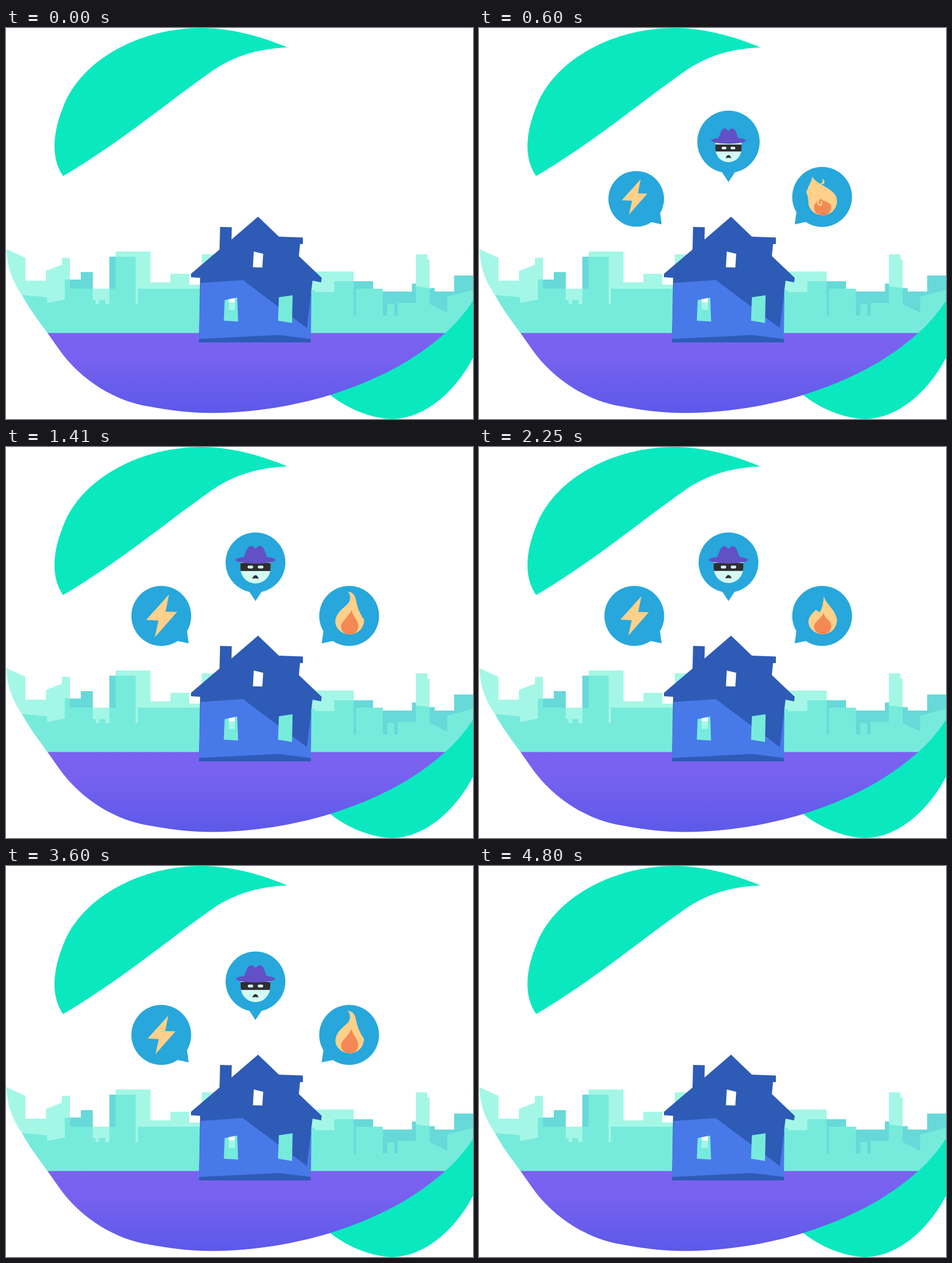
An HTML page with a canvas for the animation above (5.43 s loop, 818 by 684 pixels).

```html
<!DOCTYPE html>
<html lang="en">
<head>
<meta charset="utf-8">
<title>Home risks</title>
<style>
html, body { margin: 0; width: 100%; height: 100%; overflow: hidden; background: #fff; }
canvas { display: block; width: 818px; height: 684px; }
</style>
</head>
<body>
<canvas id="stage" width="818" height="684"></canvas>
<script>
const ctx = document.getElementById('stage').getContext('2d');
const LOOP = 5430, STEP = 30, END = 4.8, EXIT = 0.28;
const C = {
  teal: '#0ae8c0', skyLight: '#a4f7e6', skyMid: '#77ebdb', skyDark: '#67d9d9',
  wallDark: '#2d5bb6', wall: '#4879e9', bubble: '#27a7dc', gold: '#ffd08a',
  ember: '#f58956', hat: '#6250c6', face: '#d3fbf3', mask: '#302e31'
};

function fill(d, color) {
  ctx.fillStyle = color;
  ctx.fill(typeof d === 'string' ? new Path2D(d) : d);
}
function rect(x, y, w, h, color) {
  ctx.fillStyle = color;
  ctx.fillRect(x, y, w, h);
}
function scaled(k, x, y, draw) {
  if (k <= 0) return;
  ctx.save();
  ctx.translate(x, y);
  ctx.scale(k, k);
  ctx.translate(-x, -y);
  draw();
  ctx.restore();
}

// ---- Static scenery ----
const blob = new Path2D('M1 0V387C1 412 9 440 28 467C45 498 60 515 73 534L92 561' +
  'C133 620 197 654 250 662C287 669 325 673.5 362 673.5C435 673 505 661 568 642' +
  'C650 616 715 582 769 534Q797 509 818 477V0Z');

function drawSkyline() {
  fill('M1 387L34 402V442H70V425L98 414V402H112V456H192V391H253V445H288V430H321V449H343V396H400V458' +
    'H520V426H609V534H1Z', C.skyLight);
  fill('M112 440H131V427H152V456H112ZM181 400H192V456H181Z', C.skyDark);
  fill('M609 443H643V461H711V447H724V455H751V461H785V433H818V534H609Z', C.skyDark);
  fill('M718 396H738V405H742V455H718Z', C.skyLight);
  fill('M28 467L72 471V481L103 475V440H112V456H152V476H157V483H163V476H174V483H181V456H192V400H227' +
    'V483H231V456H500V458H541V462H575V443H609V503H613V456H660V503H668V483H680V503H686V481H718V452' +
    'L750 456H742V483L773 498V470L818 458V534H28Z', C.skyMid);
}

function drawHouse() {
  fill('M441.5 330L478 365L520 366.5V378H515L513 399L553 437L552 445L537 442L534 465V550H338L340 437' +
    'L324 436V430L374 387.5L375 348L395.5 348.5L395 370Z', C.wallDark);
  fill('M341 446L415 441L527 525L535 458L534 544L478 537L338 544Z', C.wall);
  fill('M434 391L450.5 395L449 419L432.5 418.5Z', '#fff');
  fill('M383 476L405 471.5L406.5 513.5L381.5 512ZM478 471L502 467.5L501 516L476.5 512Z', C.skyMid);
  fill('M390 474.5L401 472.5V480H390Z', '#fff');
  rect(390, 480, 11, 13, C.skyLight);
}

function drawScene() {
  rect(0, 0, 818, 684, '#fff');
  fill('M100 259C78 226 81 183 103 131C138 52 238 0 342 0C400 0 455 18 493 34' +
    'C440 36 397 50 360 76C275 136 200 200 100 259Z', C.teal);
  fill('M568 642C600 668 645 684 676 684C730 684 785 640 818 577V460L700 560Z', C.teal);
  ctx.save();
  ctx.clip(blob);
  drawSkyline();
  const ground = ctx.createLinearGradient(0, 534, 0, 673);
  ground.addColorStop(0, '#7b62f1');
  ground.addColorStop(0.3, '#7861f0');
  ground.addColorStop(1, '#5c59e9');
  rect(0, 533.6, 818, 151, ground);
  ctx.restore();
  drawHouse();
}

// ---- Motion ----
function springIn(t, start, rise, amp, freq, decay) {
  const s = t - start - rise;
  if (s < 0) return Math.max(0, 1 + s / rise);
  return 1 + amp * Math.sin(2 * Math.PI * freq * s) * Math.exp(-decay * s);
}
const bubblePop = (t, start) => springIn(t, start, 0.3, 0.2, 4, 5);
const iconPop = (t, start) => springIn(t, start, 0.34, 0.26, 3, 3);

function backOut(t) {
  const p = Math.max(0, (t - END + EXIT) / EXIT), back = 2.2;
  return p >= 1 ? 0 : 1 - p * p * ((back + 1) * p - back);
}
function pulse(t, start) {
  const s = t - start;
  return s < 0 ? 0 : 0.11 * Math.sin(5 * Math.PI * s) * Math.exp(-5 * s);
}

// ---- Icons ----
function drawBolt(t) {
  const k = iconPop(t, 0.295) + pulse(t, 1.3) + pulse(t, 3.35);
  scaled(k, 272.5, 295.5, () =>
    fill('M284.5 261L279 288.5L297.5 289L261.5 330L267.5 303L247.5 302Z', C.gold));
}

function drawThief(t) {
  const k = iconPop(t, 0.3);
  scaled(k, 437, 210, () => {
    ctx.save();
    ctx.clip(new Path2D('M411 199H463V210C463 228 450 238 437 238C424 238 411 228 411 210Z'));
    rect(410, 198, 54, 42, C.face);
    rect(410, 203, 54, 13.8, C.mask);
    ctx.restore();
    const eyes = new Path2D();
    for (const x of [423.5, 441]) eyes.roundRect(x, 207.5, 9.5, 5, 2.2);
    fill(eyes, C.face);
    fill('M431.5 230C434 222 440 222 442.5 230Q437 228.5 431.5 230Z', C.mask);
  });
  scaled(k, 437, 193, () => {
    const brim = new Path2D('M416 194C421 188 421 173.5 430 173.5C434 173.5 435 178 437 178' +
      'C439 178 440 173.5 444 173.5C453 173.5 453 188 458 194Z');
    brim.ellipse(437, 197.5, 34.5, 6.2, 0, 0, Math.PI * 2);
    fill(brim, C.hat);
  });
}

// Key poses: only the upper outline moves, the round base stays put.
const POSES = [
  { tip: [604, 260], bend: [606, 274], side: [625, 284], crest: [590, 285], notch: [597, 289], lick: [603, 280], ember: [604, 290], curl: [0] },
  { tip: [599, 253], bend: [620, 258], side: [606, 272], crest: [586, 286], notch: [600, 273], lick: [606, 263], ember: [606, 285], curl: [0] },
  { tip: [584, 260], bend: [590, 275], side: [628, 281], crest: [573, 287], notch: [578, 275], lick: [582, 268], ember: [598, 295], curl: [1] }
];

function flamePose(t) {
  const phase = (t / 1.08 + 0.93) % 1 * 4;
  // The last pose takes twice as long to swing back to the first.
  const i = Math.min(2, Math.floor(phase));
  const p = i < 2 ? phase - i : (phase - 2) / 2;
  const mix = (1 - Math.cos(Math.PI * p)) / 2;
  const a = POSES[i], b = POSES[(i + 1) % 3], pose = {};
  for (const key in a) pose[key] = a[key].map((v, n) => v + (b[key][n] - v) * mix);
  return pose;
}

function drawFlame(t) {
  const { tip, bend, side, crest, notch, lick, ember, curl } = flamePose(t);
  const [ex, ey] = ember, hook = Math.max(0, curl[0] * 2 - 1);
  scaled(iconPop(t, 0.26), 601, 295.5, () => {
    fill(`M${tip}C${bend} ${side} 627 302C627 318 615 327.5 602 327.5S577 318 577 305` +
      `Q577 296 ${crest}L${notch}Q${lick} ${tip}Z`, C.gold);
    fill(`M${ember}C${ex} ${ey + 11} 617 301 617 313C617 322 611 327.5 602 327.5` +
      `S587 322 587 314C587 306 ${ex - 8} ${ey + 14} ${ember}Z`, C.ember);
    scaled(hook, 602, 269, () =>
      fill('M602 264C607 266 607 276 597.5 273Q602 272 602 264Z', C.gold));
    scaled(hook, 597, 303, () => {
      ctx.strokeStyle = C.gold;
      ctx.lineWidth = 2.6;
      ctx.stroke(new Path2D('M600 297C592 299 592 310 598 310Q602 309 599 303'));
    });
  });
}

// ---- Speech bubbles, anchored at their tips ----
const BUBBLES = [
  { x: 272, y: 295.5, tip: [320, 343.5], base: 'M317 322L320 343.5L299 339', start: 0.1, icon: drawBolt },
  { x: 437, y: 202, tip: [437, 269.5], base: 'M425.5 252L437 269.5L448.5 252', start: 0, icon: drawThief },
  { x: 601, y: 295.5, tip: [553, 343.5], base: 'M556 322L553 343.5L574 339', start: 0.05, icon: drawFlame }
];

function drawBubble(b, t) {
  scaled(backOut(t), ...b.tip, () => {
    scaled(bubblePop(t, b.start), ...b.tip, () => {
      fill(`${b.base}L${b.x} ${b.y}Z`, C.bubble);
      const circle = new Path2D();
      circle.arc(b.x, b.y, 52.4, 0, Math.PI * 2);
      fill(circle, C.bubble);
    });
    b.icon(t);
  });
}

let origin;
function tick(now) {
  origin ??= now;
  const t = Math.floor(((now - origin) % LOOP) / STEP) * STEP / 1000;
  drawScene();
  if (t < END) BUBBLES.forEach(b => drawBubble(b, t));
  requestAnimationFrame(tick);
}
requestAnimationFrame(tick);
</script>
</body>
</html>
```
